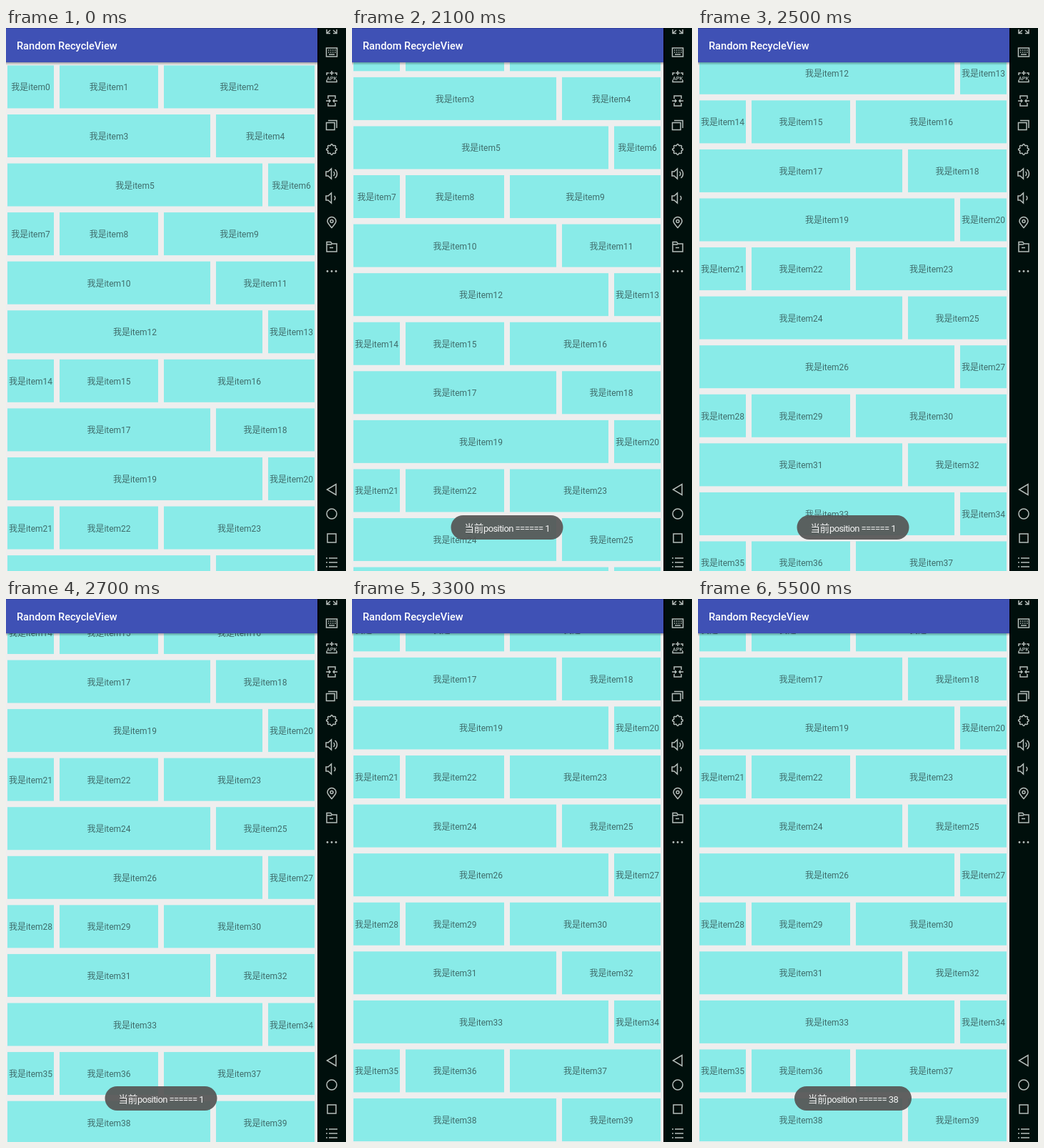
An HTML page with a canvas that plays this animation: 476 by 760 pixels, repeating every 6.3 s.

```html
<!DOCTYPE html>
<html lang="zh-CN">
<head>
<meta charset="utf-8">
<title>Random RecycleView</title>
<style>
html, body { margin: 0; width: 100%; height: 100%; overflow: hidden; background: #000f0c; }
canvas { display: block; }
</style>
</head>
<body>
<canvas id="stage" width="476" height="760"></canvas>
<script>
const ctx = document.getElementById('stage').getContext('2d');
const LOOP = 6300, STEP = 100;
const BAR = 48, LIST_W = 436;
const ROW_TOP = 52.4, PITCH = 68.57, CELL_H = 60, ITEMS = 40, MAX_SCROLL = 450.5;
const FONTS = 'Roboto, "Noto Sans CJK SC", "Noto Sans CJK", sans-serif';

// Cell spans [left, right] of the three repeating row layouts
const LAYOUTS = [
  [[2, 67], [75, 213], [221, 432]],
  [[2, 286], [294, 432]],
  [[2, 359], [367, 432]]
];

// Line icons, centred on the toolbar axis: [y, path]
const ICONS = [
  [0, 'M-7 2V7.5H-2M-7 7.5L-2 3M7 2V7.5H2M7 7.5L2 3'],
  [34, 'M-7.5-6H7.5V6H-7.5ZM-5-3H-3.5M-2-3H-.5M1-3H2.5M4-3H5.5M-5 0H-3.5M-2 0H-.5M1 0H2.5M4 0H5.5M-4 3H4'],
  [68, 'M-7-2V-5H-4M4-5H7V-2M0-8V-2M-3-5H3M-7 5V7.5H7V5'],
  [102, 'M-5-3V-7H5V-3M-5 3V7H5V3M-8 0H-2M-4-2L-2 0L-4 2M8 0H2M4-2L2 0L4 2'],
  [136, 'M-7.5-3.5H4V6.5H-7.5ZM-5-6.5H7V4'],
  [204, 'M-8-3H-5L-.5-7V7L-5 3H-8ZM2.5-3A4 4 0 0 1 2.5 3M4.5-6A7.5 7.5 0 0 1 4.5 6'],
  [238, 'M-8-3H-5L-.5-7V7L-5 3H-8ZM3.5-3A4 4 0 0 1 3.5 3'],
  [272, 'M0 7.5C-4 3-6 1-6-1.5A6 6 0 0 1 6-1.5C6 1 4 3 0 7.5ZM-2-1.5A2 2 0 1 1 2-1.5A2 2 0 1 1-2-1.5'],
  [306, 'M-7-6.5H-1.5L.5-4H7V7H-7ZM-7-3H0M-3 1.5H2'],
  [646, 'M6-7.5V7.5L-6.5 0Z'],
  [680, 'M-7 0A7 7 0 1 1 7 0A7 7 0 1 1-7 0'],
  [714, 'M-6-6H6V6H-6Z'],
  [748, 'M-8-6H-6M-4-6H8M-8 0H-6M-4 0H8M-8 6H-6M-4 6H8']
].map(([y, d]) => [y, new Path2D(d)]);

const clamp = (v, lo, hi) => Math.min(hi, Math.max(lo, v));
const ramp = (t, from, to) => clamp((t - from) / (to - from), 0, 1);

function box(x, y, w, h, color) {
  ctx.fillStyle = color;
  ctx.fillRect(x, y, w, h);
}

function label(text, x, y, font, color, align = 'left', spacing = 0) {
  ctx.font = font + ' ' + FONTS;
  ctx.fillStyle = color;
  ctx.textAlign = align;
  ctx.letterSpacing = spacing + 'px';
  ctx.fillText(text, x, y);
}

// Decelerating fling, stopped by the end of the list
function scrollAt(t) {
  const u = Math.max(0, (t - 2050) / 100);
  return u > 7 ? MAX_SCROLL : Math.min(MAX_SCROLL, 107.1 * u - 5.9 * u * u);
}

function drawList(scroll) {
  box(0, BAR, LIST_W, 760 - BAR, '#eeeeee');
  for (let row = 0, item = 0; item < ITEMS; row++) {
    const y = ROW_TOP + row * PITCH - scroll;
    for (const [left, right] of LAYOUTS[row % 3]) {
      if (y > -CELL_H && y < 760) {
        box(left, y, right - left, CELL_H, '#89ebe8');
        label('我是item' + item, (left + right) / 2, Math.round(y + 35), '12px', 'rgba(0,0,0,.54)', 'center');
      }
      item++;
    }
  }
}

function drawHeader() {
  box(0, 0, LIST_W, BAR, '#3f51b5');
  box(0, 0, LIST_W, 1, '#303f9f');
  const shade = ctx.createLinearGradient(0, BAR, 0, BAR + 4);
  shade.addColorStop(0, 'rgba(0,0,0,.32)');
  shade.addColorStop(1, 'rgba(0,0,0,0)');
  box(0, BAR, LIST_W, 4, shade);
  label('Random RecycleView', 15, 30, '500 14.6px', '#fff');
}

function drawToast(position, alpha) {
  if (alpha <= 0) return;
  const w = 150 + 7 * String(position).length, x = 217 - w / 2;
  ctx.globalAlpha = alpha;
  ctx.fillStyle = 'rgba(85,85,85,.93)';
  ctx.beginPath();
  ctx.roundRect(x, 682, w, 34, 17);
  ctx.fill();
  label('当前', x + 19, 705, '13.3px', '#f4f4f4');
  label('position ====== ' + position, x + 45.5, 705, '13px', '#f4f4f4', 'left', -.6);
  ctx.globalAlpha = 1;
}

function dot(x, y, r) {
  ctx.beginPath();
  ctx.arc(x, y, r, 0, Math.PI * 2);
  ctx.fill();
}

function drawGear() {
  ctx.beginPath();
  for (let i = 0; i <= 64; i++) {
    const a = i / 64 * Math.PI * 2, r = 6.5 + .9 * Math.cos(8 * a);
    ctx.lineTo(r * Math.cos(a), r * Math.sin(a));
  }
  ctx.stroke();
}

function drawToolbar(hover) {
  box(LIST_W, 0, 40, 760, '#000f0c');
  box(LIST_W, 0, 2, 760, '#000');
  if (hover) box(443, 259, 26, 26, '#1c2b28');
  ctx.strokeStyle = '#b6bebb';
  ctx.lineWidth = 1.5;
  const at = (y, draw) => {
    ctx.save();
    ctx.translate(456, y);
    draw();
    ctx.restore();
  };
  for (const [y, path] of ICONS) at(y, () => ctx.stroke(path));
  at(170, drawGear);
  label('APK', 456, 73, '500 7.5px', '#b6bebb', 'center');
  for (const dx of [-6, 0, 6]) dot(456 + dx, 340.5, 1.4);
}

function draw(t) {
  ctx.save();
  ctx.beginPath();
  ctx.rect(0, 0, LIST_W, 760);
  ctx.clip();
  drawList(scrollAt(t));
  drawHeader();
  drawToast(1, ramp(t, 900, 1400) * (1 - ramp(t, 2800, 3300)));
  drawToast(38, ramp(t, 4400, 4800));
  ctx.restore();
  drawToolbar(t >= 5400 && t < 5500);
}

const start = performance.now();
function tick() {
  const t = (performance.now() - start) % LOOP;
  draw(Math.floor(t / STEP) * STEP);
  requestAnimationFrame(tick);
}
tick();
</script>
</body>
</html>
```
